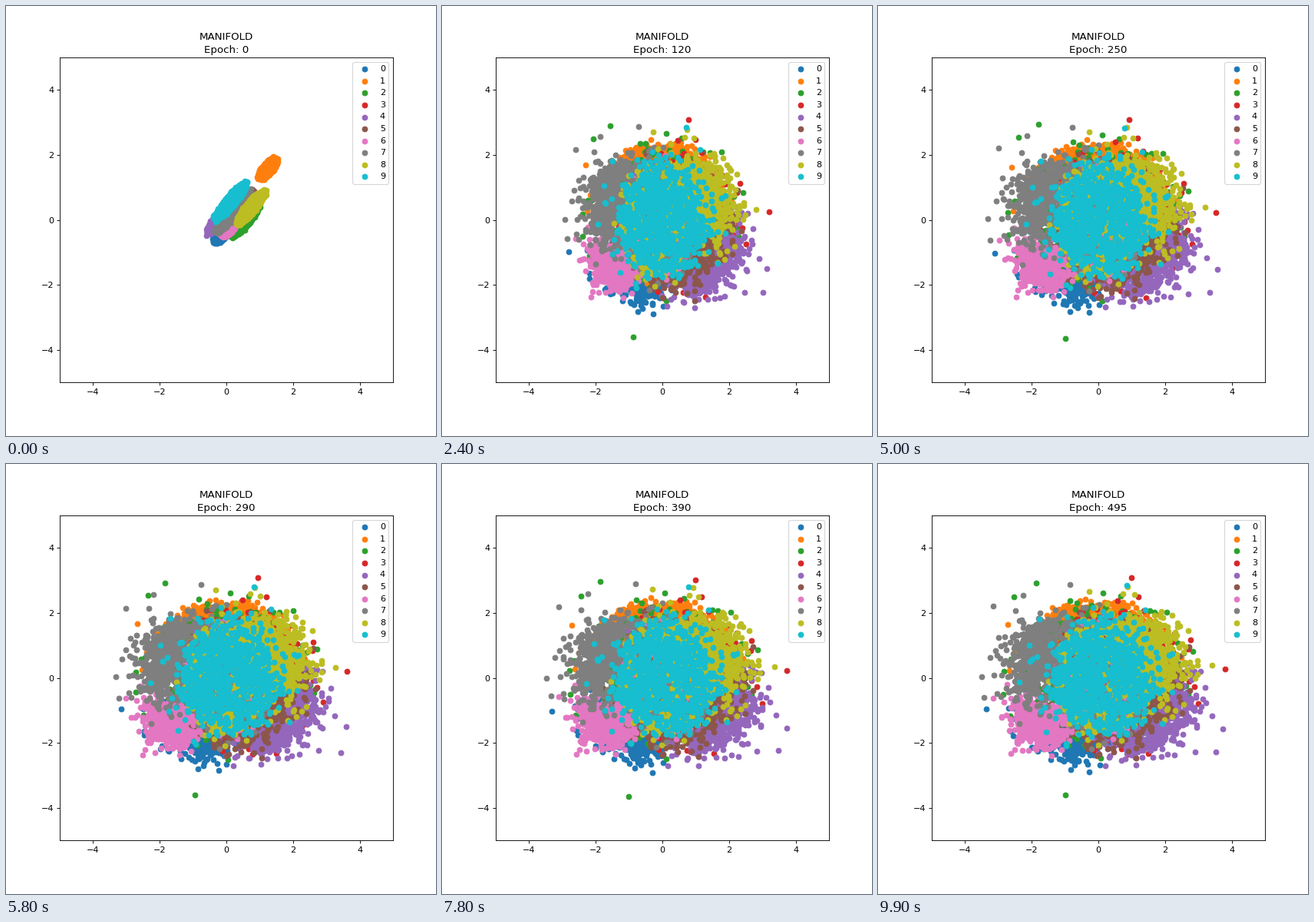
A matplotlib script for the animation above (10000 ms loop, 560 px wide and 560 px high).

```python
import numpy as np
import matplotlib.pyplot as plt
from matplotlib.animation import FuncAnimation

FRAMES, INTERVAL, STEP = 100, 100, 5
POINTS, CORE = 900, 300      # per class: all points, those in the shared core
TILT, WIDTH = 51, .16        # streaks at epoch 0
SETTLE, LAST = 120, 495

# One row per class, 0 to 9.
# Streak x, y, half length; then arc angle, angular spread, radius, thickness
CLASSES = [
    (-.15, -.42, .35, 240, 16, 2.05, .25),
    (1.23, 1.57, .40, 98, 30, 2.05, .16),
    (.55, -.02, .60, 0, 180, 1.6, .35),
    (.30, .10, .40, 10, 50, 1.5, .35),
    (-.27, -.05, .45, -38, 19, 2.1, .30),
    (.40, .40, .60, -45, 50, 1.6, .30),
    (.05, -.25, .30, 220, 10, 2.15, .28),
    (.20, .25, .75, 158, 23, 1.85, .32),
    (.72, .38, .65, 31, 25, 1.65, .40),
    (.12, .58, .72, 0, 180, 1.0, .40),
]

rng = np.random.default_rng(7)


def polar(r, degrees):
    t = np.radians(degrees)
    return np.column_stack([r * np.cos(t), r * np.sin(t)])


def soft_disc(n):
    """Points filling a unit disc with a fuzzy rim."""
    r = .9 * np.sqrt(rng.random(n)) + .12 * np.abs(rng.normal(size=n))
    return polar(r, rng.uniform(0, 360, n))


class Cloud:
    def __init__(self, x, y, length, angle, spread, radius, thick):
        streak = soft_disc(POINTS) * (length, WIDTH)
        axes = polar(1, [TILT, TILT + 90])
        self.start = streak @ axes + (x, y)

        n = POINTS - CORE
        arc = polar(radius + thick * rng.standard_t(8, n),
                    angle + spread * rng.normal(size=n))
        core = soft_disc(CORE) * (1.25, 1.85)
        self.goal = np.vstack([core, arc])
        self.phase = rng.uniform(0, 2 * np.pi, (POINTS, 2))
        self.speed = rng.uniform(.3, .9, (POINTS, 2))

    def at(self, i):
        epoch = i * STEP
        spread = 1 - np.exp(-epoch / 12)
        drift = 1 - np.exp(-max(epoch - SETTLE, 0) / 150)
        drift /= 1 - np.exp(-(LAST - SETTLE) / 150)
        # The trained cloud slowly widens and its core slides right
        goal = self.goal * (.95 + .18 * drift, 1)
        goal[:CORE, 0] += .25 * drift - .1
        goal += .035 * np.sin(self.speed * i + self.phase)
        return self.start + spread * (goal - self.start)


fig, ax = plt.subplots(figsize=(7, 7), dpi=80)
fig.subplots_adjust(left=.125, right=.9, bottom=.125, top=.88)
ax.set(xlim=(-5, 5), ylim=(-5, 5),
       xticks=range(-4, 5, 2), yticks=range(-4, 5, 2))

clouds = [Cloud(*row) for row in CLASSES]
dots = [ax.scatter(*c.at(0).T, color=f"C{k}", label=str(k))
        for k, c in enumerate(clouds)]
ax.legend(loc="upper right")
title = ax.set_title("MANIFOLD\nEpoch: 0", linespacing=1.4)


def draw(i):
    for cloud, dot in zip(clouds, dots):
        dot.set_offsets(cloud.at(i))
    title.set_text(f"MANIFOLD\nEpoch: {i * STEP}")
    return [*dots, title]


anim = FuncAnimation(fig, draw, frames=FRAMES, interval=INTERVAL,
                     repeat=True, repeat_delay=0)
plt.show()
```
